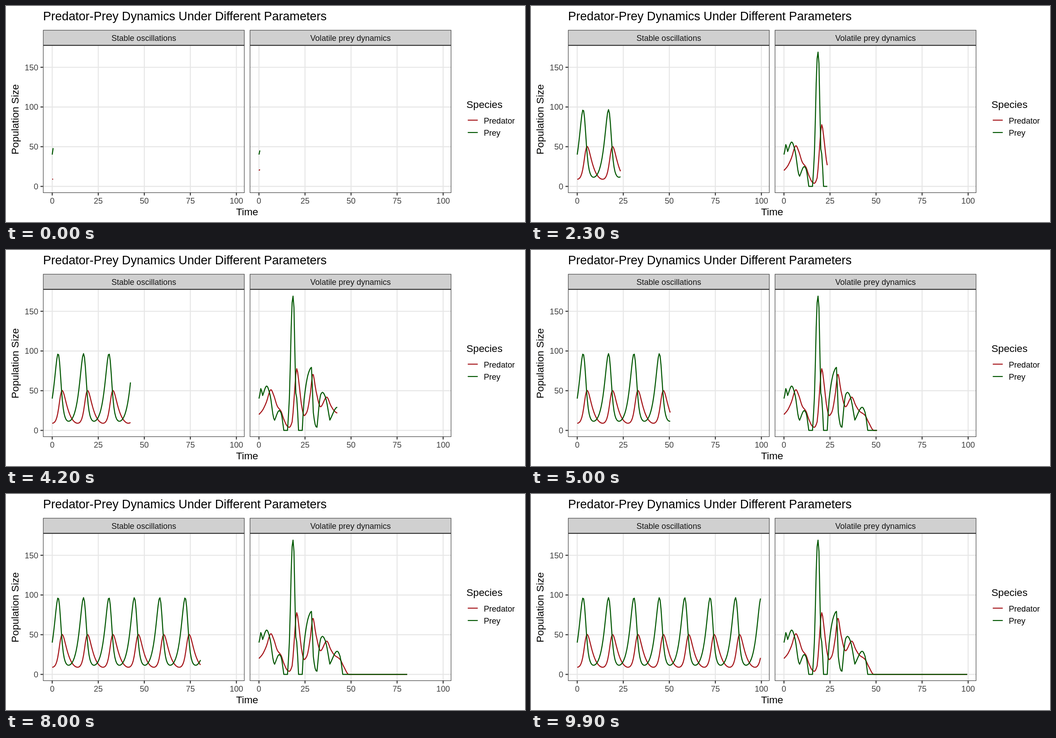
An HTML page that plays this animation: 1159x483 px, repeating every 10000 ms.

```html
<!DOCTYPE html>
<html lang="en">
<head>
<meta charset="utf-8">
<title>Predator-Prey Dynamics</title>
<style>
  html, body { margin: 0; width: 100%; height: 100%; overflow: hidden; background: #fff; }
  svg { display: block; font-family: "Liberation Sans", Arial, sans-serif; }
</style>
</head>
<body>
<svg id="chart" width="1159" height="483" viewBox="0 0 1159 483"></svg>
<script>
const chart = document.getElementById('chart');
const RED = '#a41217', GREEN = '#005600', INK = '#333', GRID = '#e6e6e6', LINE = 2.2;
const PANEL = { left: 82.7, width: 450, top: 88, bottom: 418, gap: 461.7 };
const STEP = 0.5, COUNT = 200;
const toX = t => 103.2 + 4.113 * t;
const toY = v => 403.4 - 1.776 * v;

function add(tag, attrs, parent = chart) {
  const node = document.createElementNS('http://www.w3.org/2000/svg', tag);
  for (const key in attrs) node.setAttribute(key, attrs[key]);
  parent.appendChild(node);
  return node;
}
function line(x1, y1, x2, y2, stroke, parent) {
  add('line', { x1, y1, x2, y2, stroke, 'stroke-width': LINE }, parent);
}
function text(x, y, size, content, attrs = {}, parent = chart) {
  add('text', { x, y, 'font-size': size, fill: '#000', ...attrs }, parent).textContent = content;
}
// Outline drawn just inside the given edges
function frame(top, bottom, fill, parent) {
  add('rect', { x: PANEL.left + 0.55, y: top + 0.55, width: PANEL.width - 1.1,
    height: bottom - top - 1.1, fill, stroke: INK, 'stroke-width': 1.1 }, parent);
}

// Lotka-Volterra model, integrated with RK4
function oscillations() {
  const rate = ([x, y]) => [0.6 * x - 0.025 * x * y, 0.01 * x * y - 0.4 * y];
  const move = (s, k, h) => [s[0] + h * k[0], s[1] + h * k[1]];
  const prey = [], predator = [], substeps = 10, h = STEP / substeps;
  let state = [40, 9];
  for (let i = 0; i < COUNT; i++) {
    prey.push(state[0]);
    predator.push(state[1]);
    for (let j = 0; j < substeps; j++) {
      const a = rate(state), b = rate(move(state, a, h / 2));
      const c = rate(move(state, b, h / 2)), d = rate(move(state, c, h));
      state = state.map((s, n) => s + h / 6 * (a[n] + 2 * b[n] + 2 * c[n] + d[n]));
    }
  }
  return { prey, predator };
}

// Monotone cubic through a few [time, value] knots, then constant.
// With sharpLows, the curve meets its low points at an angle.
function sample(knots, sharpLows) {
  const last = knots.length - 1;
  const secant = i => (knots[i + 1][1] - knots[i][1]) / (knots[i + 1][0] - knots[i][0]);
  const slope = (i, segment) => {
    if (i === 0) return secant(0);
    if (i === last) return sharpLows ? secant(last - 1) : 0;
    const a = secant(i - 1), b = secant(i);
    if (a * b > 0) return 2 * a * b / (a + b);
    return sharpLows && a <= 0 && b >= 0 ? secant(segment) : 0;
  };
  return Array.from({ length: COUNT }, (_, n) => {
    const t = n * STEP;
    if (t >= knots[last][0]) return knots[last][1];
    const i = knots.findIndex(k => k[0] > t) - 1;
    const [t0, v0] = knots[i], [t1, v1] = knots[i + 1];
    const h = t1 - t0, u = (t - t0) / h, w = 1 - u;
    return v0 * w * w * (1 + 2 * u) + v1 * u * u * (1 + 2 * w)
      + h * u * w * (w * slope(i, i) - u * slope(i + 1, i));
  });
}

const volatile = {
  prey: sample([[0, 40], [0.5, 45.3], [1, 52.6], [2, 44], [4.2, 56], [6, 45], [8, 15.3],
    [8.5, 12.8], [11, 25], [12, 22], [13.5, 0], [15.5, 0], [16.5, 40], [18, 161], [18.5, 169],
    [19, 155], [20, 47], [20.5, 41], [21.5, 0], [23.5, 0], [24.5, 39], [27, 73], [28.5, 79.3],
    [29.5, 23], [31, 4.6], [31.5, 4], [33.5, 45], [34.5, 48], [36, 42.5], [38.5, 13],
    [42.5, 29.2], [44, 23], [45.5, 0]], true),
  predator: sample([[0, 20], [2, 25.6], [4, 35.4], [6.5, 51.3], [8, 44.3], [10, 30.3], [12, 24],
    [13.5, 14], [15.5, 5], [16.5, 3.9], [18, 10.7], [19, 38], [20.5, 77.7], [22, 54],
    [23, 33.5], [24.5, 18.6], [26, 23], [28, 48], [29.2, 71.5], [31, 49.5], [33.4, 29.7],
    [36.8, 42], [39, 31.3], [41, 24.3], [44, 19], [46, 10], [48.8, 0]], false)
};

const curves = [];
function panel(index, label, data) {
  const group = add('g', { transform: `translate(${index * PANEL.gap} 0)` });
  const right = PANEL.left + PANEL.width;
  for (const v of [0, 50, 100, 150]) {
    line(PANEL.left, toY(v), right, toY(v), GRID, group);
    if (index === 0) {
      line(PANEL.left - 5.7, toY(v), PANEL.left, toY(v), INK, group);
      text(72, toY(v) + 6.6, 18.07, v, { 'text-anchor': 'end', fill: '#404040' }, group);
    }
  }
  for (const t of [0, 25, 50, 75, 100]) {
    line(toX(t), PANEL.top, toX(t), PANEL.bottom, GRID, group);
    line(toX(t), PANEL.bottom, toX(t), PANEL.bottom + 5.7, INK, group);
    text(toX(t), 441.6, 18.07, t, { 'text-anchor': 'middle', fill: '#404040' }, group);
  }
  for (const [values, stroke] of [[data.predator, RED], [data.prey, GREEN]]) {
    const path = add('polyline', { fill: 'none', stroke, 'stroke-width': 2.3,
      'stroke-linejoin': 'round' }, group);
    const points = values.map((v, i) => `${toX(i * STEP).toFixed(2)},${toY(v).toFixed(2)}`);
    curves.push({ path, points });
  }
  frame(PANEL.top, PANEL.bottom, 'none', group);
  frame(53.6, PANEL.top, '#d0d0d0', group);
  text(PANEL.left + PANEL.width / 2, 78.2, 18.07, label,
    { 'text-anchor': 'middle', fill: '#141414' }, group);
}

text(82.7, 32, 27.1, 'Predator-Prey Dynamics Under Different Parameters');
panel(0, 'Stable oscillations', oscillations());
panel(1, 'Volatile prey dynamics', volatile);
text(538.5, 468, 22.6, 'Time', { 'text-anchor': 'middle' });
text(0, 0, 22.6, 'Population Size',
  { 'text-anchor': 'middle', transform: 'translate(28 253.5) rotate(-90)' });
text(1028.3, 228.4, 22.6, 'Species');
[['Predator', RED], ['Prey', GREEN]].forEach(([name, color], i) => {
  const y = 255.3 + 27.6 * i;
  line(1031.2, y, 1053.5, y, color);
  text(1067, y + 7.2, 18.07, name);
});

// One time unit is revealed every 100 ms
let shown = -1;
function draw() {
  const step = Math.floor(performance.now() / 100) % 100;
  if (step !== shown) {
    shown = step;
    for (const { path, points } of curves)
      path.setAttribute('points', points.slice(0, 2 * step + 2).join(' '));
  }
  requestAnimationFrame(draw);
}
draw();
</script>
</body>
</html>
```
